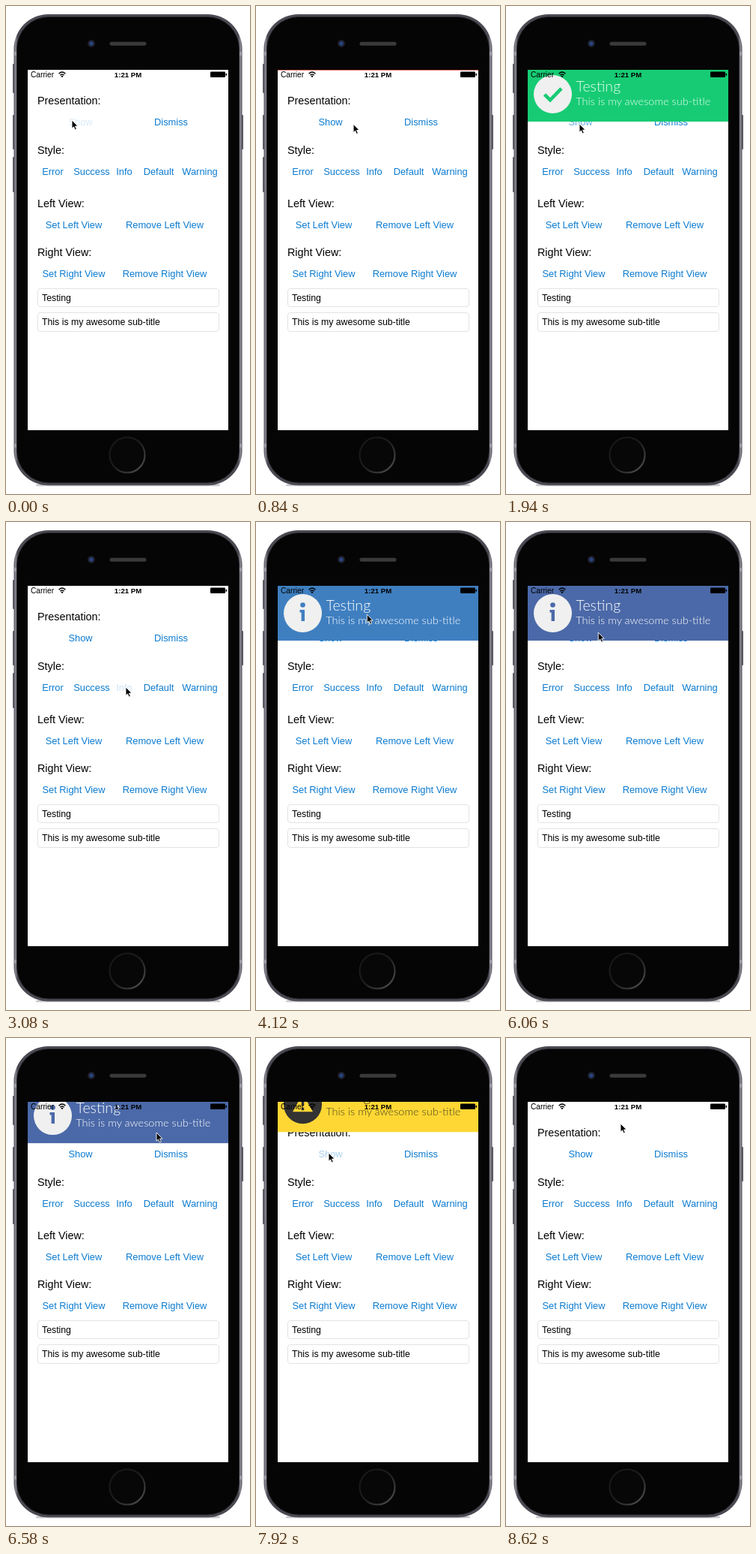
Write an HTML page that moves like this. It is 326 px wide and 650 px high and loops after 8.64 s.

```html
<!DOCTYPE html>
<html lang="en">
<head>
<meta charset="utf-8">
<title>Notification banners</title>
<style>
  html, body { margin: 0; width: 100%; height: 100%; overflow: hidden; background: #fff; }
  svg { display: block; width: 326px; height: 650px; }
  text { font-family: "Liberation Sans", Arial, sans-serif; white-space: pre; }
  .label { font-size: 14.35px; }
  .button { font-size: 12.87px; fill: #0b7bd0; text-anchor: middle; }
  .field { font-size: 12.3px; }
  .banner text { font-family: Lato, "Open Sans", sans-serif; font-weight: 300; }
</style>
</head>
<body>
<svg viewBox="0 0 326 650">
  <defs>
    <clipPath id="screen"><rect x="29" y="85" width="268" height="480"/></clipPath>
    <linearGradient id="rim" x1="0" x2="1">
      <stop offset="0" stop-color="#55545c"/><stop offset=".008" stop-color="#8b8a94"/>
      <stop offset=".016" stop-color="#4b4a52"/><stop offset=".984" stop-color="#4b4a52"/>
      <stop offset=".992" stop-color="#8b8a94"/><stop offset="1" stop-color="#55545c"/>
    </linearGradient>
    <linearGradient id="home" x1="0" y1="0" x2="1" y2="1">
      <stop offset="0" stop-color="#151515"/><stop offset=".5" stop-color="#1c1c1c"/>
      <stop offset="1" stop-color="#555"/>
    </linearGradient>
  </defs>

  <!-- Phone body -->
  <g fill="#5d5c65">
    <rect x="9" y="77" width="4" height="39" rx="1"/>
    <rect x="9" y="145" width="4" height="46" rx="1"/>
    <rect x="9" y="201" width="4" height="47" rx="1"/>
    <rect x="313" y="145" width="4" height="46" rx="1"/>
  </g>
  <rect x="40" y="637" width="246" height="2.6" rx="1.3" fill="#c9c9cc"/>
  <rect x="10.5" y="11" width="305" height="627.5" rx="46" fill="url(#rim)"/>
  <g fill="#9b9aa3">
    <rect x="10.5" y="61" width="4" height="5"/><rect x="311.5" y="61" width="4" height="5"/>
    <rect x="10.5" y="583" width="4" height="5"/><rect x="311.5" y="583" width="4" height="5"/>
  </g>
  <rect x="14.5" y="14.5" width="297" height="620.5" rx="42.5" fill="#050505" stroke="#25252a"/>
  <circle cx="114" cy="50" r="5" fill="#1d1f2b"/>
  <circle cx="114" cy="50" r="2.7" fill="#29447f"/>
  <rect x="138.5" y="47.7" width="49" height="5" rx="2.5" fill="#3b3a3a"/>
  <circle cx="162" cy="598" r="23.5" fill="#070707" stroke="url(#home)" stroke-width="2.2"/>
  <rect x="29" y="85" width="268" height="480" fill="#fff"/>

  <g id="page">
    <g fill="#fff" stroke="#e3e3e3">
      <rect x="42.5" y="376.5" width="242" height="24" rx="3.5"/>
      <rect x="42.5" y="408.5" width="242" height="25" rx="3.5"/>
    </g>
    <text class="field" x="48" y="393">Testing</text>
    <text class="field" x="48" y="425.3">This is my awesome sub-title</text>
  </g>

  <g clip-path="url(#screen)"><g id="banner" class="banner">
    <rect id="panel" x="29" y="85" width="268" height="73"/>
    <circle id="disc" cx="62.5" cy="121.5" r="25.5"/>
    <g id="icon"></g>
    <g id="words">
      <text x="93.5" y="117.8" font-size="19.6">Testing</text>
      <text x="93.3" y="135.8" font-size="14.5">This is my awesome sub-title</text>
    </g>
  </g></g>

  <!-- Status bar -->
  <text x="33" y="95" font-size="10.2">Carrier</text>
  <g fill="none" stroke="#000" stroke-width="1.4">
    <path d="M70.6 90.2Q75 86 79.4 90.2M72.4 92.2Q75 89.6 77.6 92.2"/>
  </g>
  <path d="M73.4 93.4Q75 92 76.6 93.4L75 95.2Z"/>
  <text x="163" y="95" font-size="9.6" font-weight="700" text-anchor="middle">1:21 PM</text>
  <rect x="273" y="87.6" width="20" height="7.4" rx="1.2"/>
  <rect x="293.6" y="89.8" width="1.5" height="3" rx=".6"/>

  <circle id="ring" r="15" fill="none" stroke="#0a0a0a" stroke-width="2.5"/>
  <path id="cursor" d="M0 0V11.2L2.5 8.9L4.3 13L6.3 12.1L4.5 8.1H8Z" fill="#000" stroke="#fff" stroke-width=".9"/>
</svg>
<script>
const LOOP = 8640, SLIDE = 260, FADE = 350;
const $ = id => document.getElementById(id);
const clamp = v => Math.min(1, Math.max(0, v));
const easeOut = p => 1 - (1 - p) ** 3;
const easeInOut = p => p < .5 ? 2 * p * p : 1 - 2 * (1 - p) ** 2;

const labels = [['Presentation:', 131], ['Style:', 197], ['Left View:', 267.6], ['Right View:', 333]];
const rows = [
  [158.8, ['Show', 99.5], ['Dismiss', 220.5]],
  [225.2, ['Error', 62.5], ['Success', 114.5], ['Info', 158], ['Default', 204], ['Warning', 259]],
  [295.8, ['Set Left View', 90.5], ['Remove Left View', 212]],
  [361.2, ['Set Right View', 90.5], ['Remove Right View', 212]]
];

// Mouse presses: down, up, button (none: tap on the banner)
const presses = [
  [-80, 0, 'Show'], [500, 580],
  [1140, 1230, 'Success'], [1650, 1740, 'Show'], [2260, 2350],
  [2970, 3060, 'Info'], [3410, 3500, 'Show'], [4280, 4370],
  [5180, 5270, 'Default'], [5640, 5730, 'Show'], [6390, 6470],
  [7170, 7260, 'Warning'], [7740, 7840, 'Show'], [8240, 8320]
];

// Pointer path: time, x, y
const path = [
  [0, 88, 152], [180, 89, 151], [470, 140, 120], [640, 140, 120],
  [1100, 114, 218], [1260, 114, 218], [1600, 98, 157], [1960, 98, 157],
  [2230, 150, 122], [2400, 150, 122], [2900, 160, 220], [3090, 160, 220],
  [3380, 98, 154], [3720, 98, 154], [4180, 150, 122], [4440, 150, 122],
  [5100, 203, 218], [5300, 203, 218], [5600, 98, 154], [5900, 98, 154],
  [6360, 201, 126], [6600, 201, 126], [7120, 258, 218], [7290, 258, 218],
  [7690, 97, 153], [7960, 97, 153], [8220, 153, 114], [8640, 153, 114]
];

const info = '<circle cx="62.5" cy="110.5" r="3.3"/><path d="M58.5 117H65V132H60.6V120.4H58.5Z"/>';
const styles = {
  error: { back: '#e5493f', disc: '#f0f0f0', text: '#fff',
    icon: '<path d="M53 112L72 131M72 112L53 131" fill="none" stroke="#e5493f" stroke-width="4.6"/>' },
  success: { back: '#17cb74', disc: '#f0f0f0', text: '#eafff2',
    icon: '<path d="M51.5 122L59 129.3L74 114" fill="none" stroke="#17cb74" stroke-width="4.6"/>' },
  info: { back: '#3f7fc0', disc: '#f0f0f0', text: '#fff', icon: info },
  plain: { back: '#4b69a8', disc: '#f0f0f0', text: '#fff', icon: info },
  warning: { back: '#fed734', disc: '#333', text: '#4a431f',
    icon: '<path d="M62.5 107L76 131H49Z"/><path d="M62.5 114.5V123M62.5 125.5V129" stroke="#333" stroke-width="3.4"/>' }
};

// Banner runs: style, slide-in start, slide-out start
const runs = [
  ['error', 20, 600], ['success', 1780, 2370], ['info', 3540, 4400],
  ['plain', 5760, 6490], ['warning', 7860, 8340]
];

const buttons = {};
function addText(cls, x, y, str) {
  const el = document.createElementNS('http://www.w3.org/2000/svg', 'text');
  el.setAttribute('class', cls);
  el.setAttribute('x', x);
  el.setAttribute('y', y);
  el.textContent = str;
  $('page').append(el);
  return el;
}
labels.forEach(([str, y]) => addText('label', 42, y, str));
rows.forEach(([y, ...items]) => items.forEach(([str, x]) => {
  buttons[str] = addText('button', x, y, str);
}));

function pointerAt(t) {
  const i = Math.max(1, path.findIndex(k => k[0] > t));
  const [t0, x0, y0] = path[i - 1], [t1, x1, y1] = path[i];
  const p = easeInOut((t - t0) / (t1 - t0));
  return [x0 + (x1 - x0) * p, y0 + (y1 - y0) * p];
}

let shown = '';
function setStyle(name) {
  if (name === shown) return;
  shown = name;
  const s = styles[name];
  $('panel').setAttribute('fill', s.back);
  $('disc').setAttribute('fill', s.disc);
  $('icon').setAttribute('fill', s.back);
  $('icon').innerHTML = s.icon;
  $('words').setAttribute('fill', s.text);
}

function drawBanner(t) {
  const run = runs.find(r => t >= r[1] && t < r[2] + SLIDE);
  $('banner').style.display = run ? '' : 'none';
  if (!run) return;
  setStyle(run[0]);
  const shownPart = easeOut(clamp((t - run[1]) / SLIDE)) - easeInOut(clamp((t - run[2]) / SLIDE));
  $('banner').setAttribute('transform', `translate(0 ${-73 * (1 - shownPart)})`);
}

function drawPresses(t, x, y) {
  for (const name in buttons) buttons[name].setAttribute('opacity', 1);
  let down = false;
  for (const [from, to, name] of presses) {
    if (t >= from && t < to) down = true;
    if (name && t >= from && t < to + FADE)
      buttons[name].setAttribute('opacity', .15 + .85 * clamp((t - to) / FADE));
  }
  $('ring').style.display = down ? '' : 'none';
  $('ring').setAttribute('transform', `translate(${x} ${y + 2})`);
}

function draw(now) {
  const t = now % LOOP;
  const [x, y] = pointerAt(t);
  drawBanner(t);
  drawPresses(t, x, y);
  $('cursor').setAttribute('transform', `translate(${x} ${y})`);
}

const start = performance.now();
function tick() {
  draw(performance.now() - start);
  requestAnimationFrame(tick);
}
tick();
</script>
</body>
</html>
```
